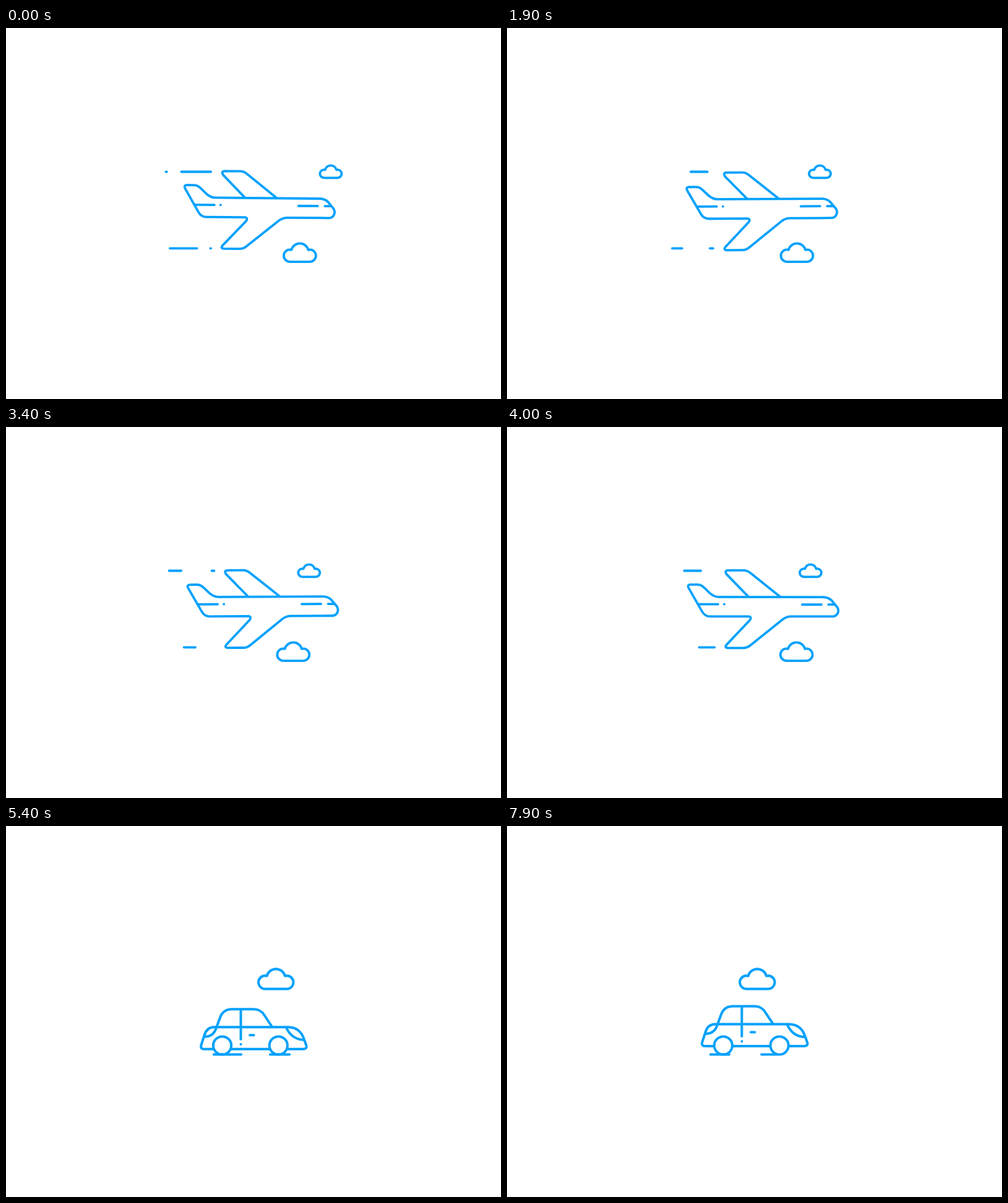
An HTML page that plays this animation: 800 px wide and 600 px high, repeating every 8000 ms.

```html
<!DOCTYPE html>
<html lang="en">
<head>
<meta charset="utf-8">
<title>Travel icons</title>
<style>
  html, body { margin: 0; width: 100%; height: 100%; overflow: hidden; background: #fff; }
  svg { display: block; width: 100vw; height: 100vh; }
  path, circle { vector-effect: non-scaling-stroke; }
</style>
</head>
<body>
<svg viewBox="0 0 800 600" fill="none" stroke="#03a1fc" stroke-linecap="round" stroke-linejoin="round">
  <defs>
    <path id="cloud" d="M-17.5 10.7A10.7 10.7 0 0 1-17.5-10.7L-14.7-10.2A15.2 15.2 0 0 1 14.7-10.2L17.5-10.7A10.7 10.7 0 0 1 17.5 10.7Z"/>
  </defs>

  <g id="flight" stroke-width="3.8">
    <use id="smallCloud" href="#cloud"/>
    <use id="bigCloud" href="#cloud"/>
    <path id="topTrail"/>
    <path id="lowTrail"/>
    <g id="plane">
      <path d="M297 256.5H309Q314 256.5 318 260L329 270.5Q336 276.5 343 276.5L513 277Q523 277.2 529 286.5L534.5 293C539 300 534.5 308.2 527 308.2H460Q453 308.2 447 312.5L394 355Q389 359 383 359H358Q352 358.5 355.5 354L393.5 314Q397 308.5 391 308H329Q321 308 316.5 300.5L294.5 262Q292 257 297 256.5Z"/>
      <path d="M391 276L356 240Q352 234 358 233.6H383Q389 233.6 394 237.5L442 276"/>
      <path d="M311 288.3H342M352 288.3h.1M478 289H509M520.5 289H530"/>
    </g>
  </g>

  <g id="drive" stroke-width="4">
    <use id="carCloud" href="#cloud"/>
    <g id="car">
      <path d="M340 320.5H336Q324 321 320.5 334L315.3 350Q314 356 320 356H480Q487 356 485.3 350L482 341Q476 321 456 320.5Z"/>
      <path d="M340.5 320L346 305Q351 291.5 365 291.5H400Q412 291.5 418 302L430 320"/>
      <path d="M379.5 292V340M379.5 348.3h.1M394 333.4H400.5"/>
      <path d="M320.5 336Q336 336 340 321M453 321.5Q462 340.5 481 341"/>
    </g>
    <g fill="#fff">
      <circle cx="349.5" cy="355" r="14.6"/>
      <circle cx="440.3" cy="355" r="14.6"/>
    </g>
    <path id="rearRoad"/>
    <path id="frontRoad"/>
  </g>
</svg>
<script>
const LOOP = 8, CUT = 4.1, STEP = 0.1, CAP = 1.9;
const { PI, cos, sin, min, max, floor } = Math;
const $ = id => document.getElementById(id);
const wave = (t, mid, amp, period, peak = 0) => mid + amp * cos(2 * PI * (t - peak) / period);
const move = (id, transform) => $(id).setAttribute('transform', transform);

// Row of dashes running left, seen only between `from` and `to`.
// start(k) and length(k) describe the dash with index k.
function drawTrail(id, { y, from, to, start, length }, travel, shift = 0) {
  let d = '';
  for (let k = -2; k < 8; k++) {
    const a = start(k) - travel;
    const left = max(a, from) + CAP, right = min(a + length(k), to) - CAP;
    if (right > left) d += `M${left + shift} ${y}H${right + shift}`;
  }
  $(id).setAttribute('d', d);
}

const topTrail = {
  y: 232.5, from: 256.5, to: 333,
  start: k => 281.5 + 74.7 * k + 4.5 * sin(k * PI / 4),
  length: k => wave(k, 42, 16, 8, -1)
};
const lowTrail = {
  y: 356.3, from: 263, to: 333,
  start: k => 259.5 + 69 * k,
  length: k => wave(k, 36.5, 17, 8, -0.7)
};
const rearRoad = {
  y: 369.6, from: 326, to: 382,
  start: k => 333 + 81 * k,
  length: k => wave(k, 54, 20, 4, 2)
};
const frontRoad = {
  y: 369.6, from: 409.5, to: 460,
  start: k => 427 + 78 * k,
  length: k => wave(k, 48, 19, 4, 2)
};

function drawFlight(t) {
  const sway = wave(t, 2.85, -2.85, 2.4);
  move('plane', `translate(${sway - 5.2} ${wave(t, -1, 1.2, 4, 1.4)}) rotate(${wave(t, -0.1, 0.5, 5.2)} 415 290)`);
  move('smallCloud', `translate(${wave(t, 507.2, 17.7, 7.2)} 235.7) scale(.62)`);
  move('bigCloud', `translate(${wave(t, 469.8, 6.3, 5, 0.5)} 368.2) scale(.92)`);
  drawTrail('topTrail', topTrail, 75 * t, sway);
  drawTrail('lowTrail', lowTrail, 75 * t, sway);
}

function drawDrive(t) {
  const s = t - 4.6;
  move('car', `translate(0 ${wave(s, 2.6, 2.6, 0.73)})`);
  move('carCloud', `translate(${446.4 - 12.7 * s} 252.8)`);
  drawTrail('rearRoad', rearRoad, 100 * s);
  drawTrail('frontRoad', frontRoad, 100 * s);
}

const begin = performance.now();
function render(now) {
  const elapsed = max(now - begin, 0) / 1000 % LOOP;
  const t = floor(elapsed / STEP + 1e-6) * STEP;
  const flying = t < CUT - 1e-6;
  $('flight').style.display = flying ? '' : 'none';
  $('drive').style.display = flying ? 'none' : '';
  (flying ? drawFlight : drawDrive)(t);
  requestAnimationFrame(render);
}
render(begin);
</script>
</body>
</html>
```
